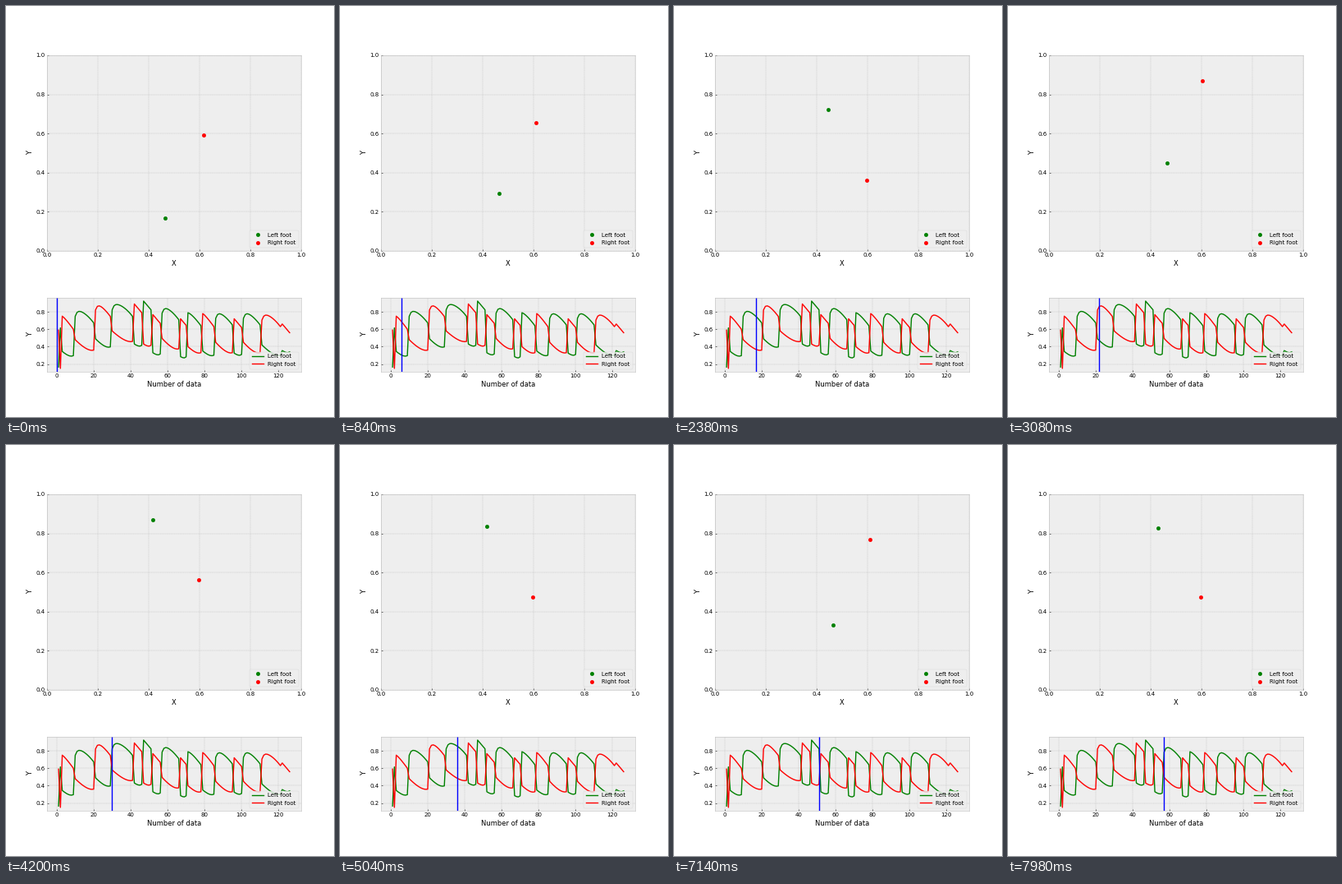
A matplotlib script for the animation above (8 s loop, 400 by 500 pixels).

```python
import matplotlib.pyplot as plt
import numpy as np
from matplotlib.animation import FuncAnimation

LOOP, TICK, STEP = 8000, 40, 140  # ms
LAST = 126

# Each step: first sample, peak of the swinging foot, height where the other lands.
STEPS = [
    (1, .59, .166), (2, .615, .15), (3, .75, .345), (10, .823, .48),
    (21, .897, .49), (30, .898, .58), (42, .89, .43), (47, .923, .43),
    (52, .768, .33), (57, .86, .495), (67, .72, .285), (71, .79, .40),
    (79, .78, .35), (86, .80, .45), (96, .72, .325), (101, .80, .45),
    (111, .78, .42), (122, .66, .355),
]
SWINGING = "RL" * 8 + "RR"


def swing(top, size):
    """Quick rise to the peak, then a slow fall; short steps start at the peak."""
    k = np.arange(size)
    u = k / max(size - 1, 1)
    dip = .075 * np.exp(-k) if size > 8 else 0
    drop = .15 * min(1, (size - 1) / 6)
    return top - dip - drop * u ** max(1, size / 6)


def stance(land, size):
    """Settling fall, deeper for long steps, with a small lift at the end."""
    u = np.arange(size) / max(size - 1, 1)
    fall = .14 * min(1, size / 10) ** 2
    return land - fall * (1 - (1 - u) ** 1.5) + .02 * u ** 4


def walk():
    path = {"L": [], "R": []}
    ends = [step[0] for step in STEPS[1:]] + [LAST + 1]
    for (start, top, land), end, foot in zip(STEPS, ends, SWINGING):
        size = end - start
        rest = "R" if foot == "L" else "L"
        swing_x = {"L": min(.4645, .757 - .38 * top), "R": .647 - .05 * top}
        stance_x = {"L": .4645, "R": .597}
        path[foot] += [(swing_x[foot], y) for y in swing(top, size)]
        path[rest] += [(stance_x[rest], y) for y in stance(land, size)]
    return np.array(path["L"]), np.array(path["R"])


plt.style.use("bmh")
plt.rcParams["font.family"] = "DejaVu Sans"
fig = plt.figure(figsize=(8, 10), dpi=50, facecolor="white")
grid = fig.add_gridspec(8, 1)
plane = fig.add_subplot(grid[:5])
trace = fig.add_subplot(grid[6:])

samples = np.arange(1, LAST + 1)
feet = []
for path, color, name in zip(walk(), ("green", "red"), ("Left foot", "Right foot")):
    dot, = plane.plot([], [], "o", color=color, label=name)
    trace.plot(samples, path[:, 1], color=color, label=name)
    feet.append((dot, path))

plane.set(xlim=(0, 1), ylim=(0, 1), xlabel="X", ylabel="Y")
trace.set(xlabel="Number of data", ylabel="Y")
for ax in (plane, trace):
    ax.legend(loc="lower right")
cursor = trace.axvline(0, color="blue")


def update(frame):
    i = (frame * TICK + TICK // 2) // STEP
    for dot, path in feet:
        dot.set_data(path[i:i + 1].T)
    cursor.set_xdata([i, i])
    return [cursor] + [dot for dot, _ in feet]


anim = FuncAnimation(fig, update, frames=LOOP // TICK, interval=TICK,
                     init_func=lambda: update(0), repeat=True, repeat_delay=0)
plt.show()
```
